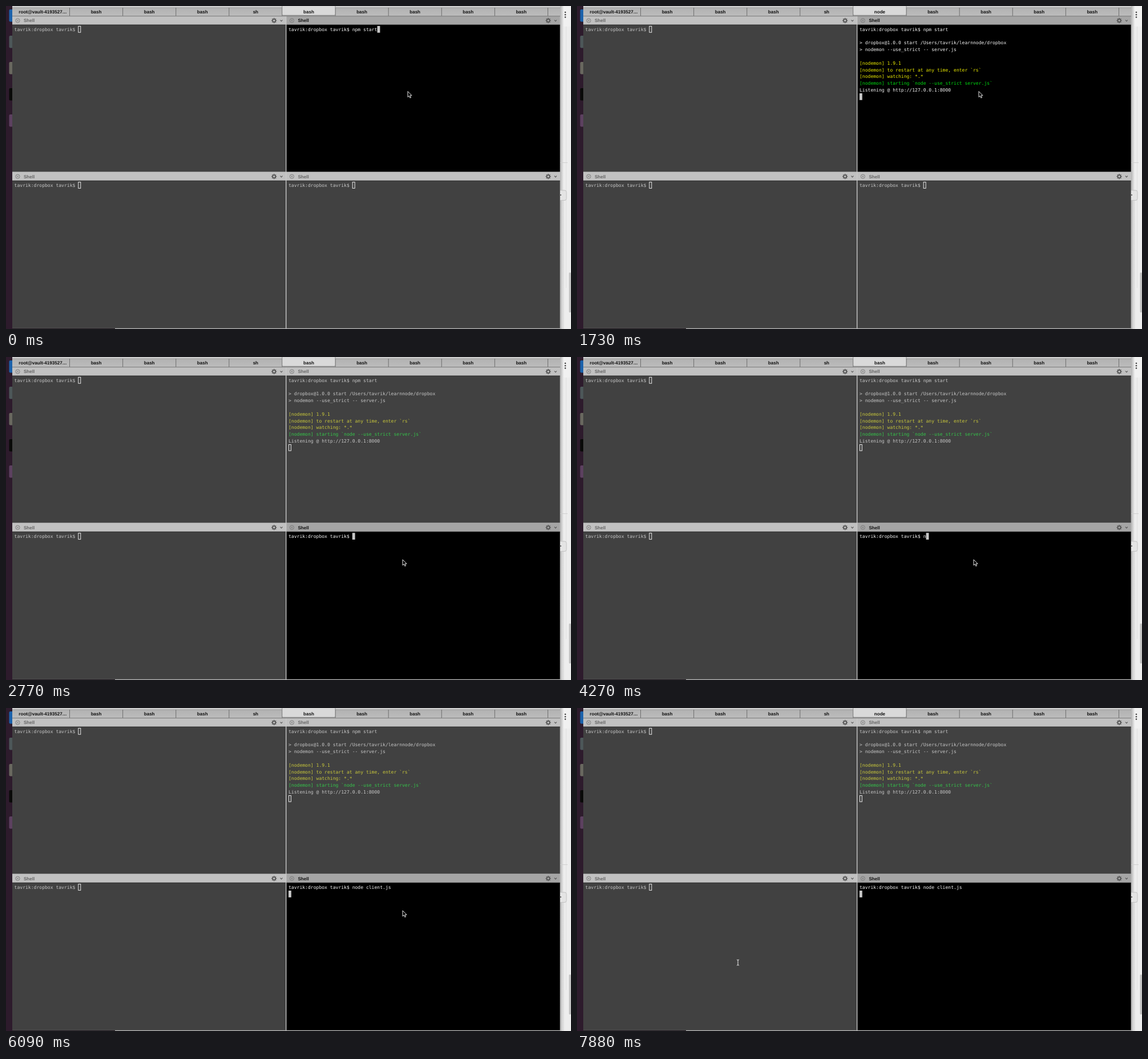
Recreate the animation shown at these times as an HTML page. Size 990 by 566 pixels, loop 8 s.

```html
<!DOCTYPE html>
<html lang="en">
<head>
<meta charset="utf-8">
<title>Split terminal</title>
<style>
html, body { margin: 0; width: 100%; height: 100%; overflow: hidden; background: #2d1b2c; }
svg { display: block; width: 990px; height: 566px; }
text { white-space: pre; text-rendering: geometricPrecision; }
.mono { font: 8.07px "DejaVu Sans Mono", monospace; }
.label { font: bold 8.05px "Liberation Sans", Arial, sans-serif; }
</style>
</head>
<body>
<svg id="stage" viewBox="0 0 990 566">
  <defs>
    <linearGradient id="tabs" x2="0" y2="1">
      <stop offset="0" stop-color="#b2b2b2"/><stop offset="1" stop-color="#bcbcbc"/>
    </linearGradient>
    <linearGradient id="shade">
      <stop offset="0" stop-color="#b4b4b4"/><stop offset="1" stop-color="#ececec"/>
    </linearGradient>
  </defs>
  <g id="back"></g>
  <g id="panes"></g>
  <g id="top"></g>
</svg>
<script>
const LOOP = 8000, CHAR = 4.86, ROW = 11.8;
const USER = "tavrik";
const PROMPT = `${USER}:dropbox ${USER}$ `;
const SVG = "http://www.w3.org/2000/svg";
const group = id => document.getElementById(id);

function add(parent, tag, attrs, content) {
  const el = document.createElementNS(SVG, tag);
  for (const key in attrs) el.setAttribute(key, attrs[key]);
  if (content !== undefined) el.textContent = content;
  parent.append(el);
  return el;
}
const rect = (parent, x, y, width, height, fill, more) =>
  add(parent, "rect", { x, y, width, height, fill, ...more });
const path = (parent, d, stroke, more) =>
  add(parent, "path", { d, stroke, fill: "none", ...more });

// Desktop around the window
function drawBack() {
  const g = group("back");
  rect(g, 0, 0, 11, 566, "#2d1b2c");
  [["#1c62ab", 6], ["#4d5759", 52], ["#69685f", 98], ["#090a08", 144], ["#5d4160", 190]]
    .forEach(([fill, y]) => rect(g, 5.5, y, 9, 21.5, fill, { rx: 2 }));
  rect(g, 971, 0, 19, 566, "#f1f1f1");
  rect(g, 971, 36, 19, 530, "#ededed");
  rect(g, 971, 0, 6, 566, "url(#shade)");
  rect(g, 976.5, 341, 1, 225, "#d5d5d5");
  rect(g, 981, 36, 1, 458, "#e0e0e0");
  rect(g, 971, 274, 13, 1, "#cfcfcf");
  rect(g, 966, 323, 16, 17.5, "#e4e4e4", { rx: 3, stroke: "#c2c2c2" });
  rect(g, 971, 330.5, 2, 1.5, "#444");
  rect(g, 986.5, 467, 3.5, 70, "#c1c1c1", { rx: 1.5 });
  [11, 15.3, 19.6].forEach(cy => add(g, "circle", { cx: 980, cy, r: 1.3, fill: "#444" }));
  rect(g, 11, 0, 960, 3, "#cdcdcd");
  rect(g, 11, 564, 180, 2, "#1d171d");
  rect(g, 191, 564, 780, 2, "#b6b6b6");
}

// Tab bar; returns the label of the selected tab
function drawTabs() {
  const g = group("top");
  const edge = i => i ? 111.5 + 93.1 * (i - 1) : 17.5;
  const label = (i, s) => add(g, "text", {
    class: "label", x: (edge(i) + edge(i + 1)) / 2, y: 13, "text-anchor": "middle", fill: "#111"
  }, s);
  rect(g, 11, 3, 960, 15, "url(#tabs)");
  rect(g, 11, 2.6, 960, .8, "#8f8f8f");
  rect(g, 11, 17.3, 960, .9, "#707070");
  for (let i = 1; i <= 10; i++) rect(g, edge(i) - .4, 3, .9, 14.5, "#666");
  rect(g, 483.8, -3, 93.2, 19.3, "#d9d9d9", { rx: 2, stroke: "#777", "stroke-width": .8 });
  ["root@vault-4193527…", "bash", "bash", "bash", "sh", "", "bash", "bash", "bash", "bash"]
    .forEach((s, i) => s && label(i, s));
  return label(5, "bash");
}

function drawGear(g, x, y) {
  for (let i = 0; i < 8; i++) {
    rect(g, x - .75, y - 4.6, 1.5, 2.2, "#555", { transform: `rotate(${i * 45} ${x} ${y})` });
  }
  add(g, "circle", { cx: x, cy: y, r: 2.5, fill: "none", stroke: "#555", "stroke-width": 1.6 });
}

function makePane(x, y, width) {
  const g = add(group("panes"), "g");
  const bar = rect(g, x, y, width, 15, "#c1c1c1");
  const cx = x + 9.5, cy = y + 7.5;
  add(g, "circle", { cx, cy, r: 3.6, fill: "none", stroke: "#777", "stroke-width": .9 });
  path(g, `M${cx - 1.4} ${cy - 1.4}l2.8 2.8m0-2.8l-2.8 2.8`, "#777", { "stroke-width": .9 });
  const title = add(g, "text", { class: "label", x: x + 20, y: y + 10.4 }, "Shell");
  drawGear(g, x + 458.7, cy);
  path(g, `M${x + 469.5} ${cy - 1}l2 2.2l2-2.2`, "#555", { "stroke-width": 1.1 });
  const body = rect(g, x, y + 15, width, y < 100 ? 257.5 : 258.5, "#414141");
  rect(g, x, y + 14.6, width, .8, "#1c1c1c");
  const lines = add(g, "g", { class: "mono" });
  const left = x + 3.6, first = y + 17;

  return function show(rows, active, row, col) {
    bar.setAttribute("fill", active ? "#a5a5a5" : "#c1c1c1");
    title.setAttribute("fill", active ? "#111" : "#666");
    body.setAttribute("fill", active ? "#000" : "#414141");
    const inks = active
      ? { w: "#f4f4f4", y: "#e9e900", g: "#00d911" }
      : { w: "#c6c6c6", y: "#c9c83b", g: "#35c64b" };
    lines.replaceChildren();
    rows.forEach(([s, ink = "w"], i) => s && add(lines, "text",
      { x: left, y: first + ROW * i + 8.7, fill: inks[ink] }, s));
    const cx = left + CHAR * col, cy = first + ROW * row;
    if (active) rect(lines, cx, cy, CHAR, ROW, "#c7c7c7");
    else rect(lines, cx + .4, cy + .4, 4, 10.8, "none", { stroke: "#f0f0f0", "stroke-width": .95 });
  };
}

const SERVER = [
  [PROMPT + "npm start"], [""],
  [`> dropbox@1.0.0 start /Users/${USER}/learnnode/dropbox`],
  ["> nodemon --use_strict -- server.js"], [""],
  ["[nodemon] 1.9.1", "y"],
  ["[nodemon] to restart at any time, enter `rs`", "y"],
  ["[nodemon] watching: *.*", "y"],
  ["[nodemon] starting `node --use_strict server.js`", "g"],
  ["Listening @ http://127.0.0.1:8000"]
];

// Each step changes part of the state from its time on.
// rows: server lines, at: server cursor [row, col], typed: client command, ran: command entered
const STEPS = [
  [0, { rows: 1, at: [0, 32], typed: "", ran: false, tab: "bash", client: false, mouse: [704, 149.6] }],
  [750, { at: [1, 0] }],
  [1140, { rows: 4, at: [5, 0] }],
  [1440, { rows: 9, at: [9, 0] }],
  [1730, { rows: 10, at: [10, 0], tab: "node" }],
  [2180, { mouse: [693.8, 250.4] }],
  [2320, { mouse: [693.8, 355] }],
  [2470, { mouse: [695, 355] }],
  [2770, { client: true, tab: "bash" }],
  [4270, { typed: "n" }],
  [4440, { typed: "no" }],
  [4590, { typed: "nod" }],
  [4740, { typed: "node" }],
  [4890, { typed: "node " }],
  [5040, { typed: "node c" }],
  [5190, { typed: "node cl" }],
  [5490, { typed: "node client.js " }],
  [6090, { ran: true }],
  [6530, { tab: "node" }],
  [7580, { mouse: [439, 388.5], beam: true }],
  [7730, { mouse: [286, 448.5] }],
  [7880, { mouse: [282, 446] }]
];

drawBack();
rect(group("panes"), 11, 18, 960, 546.5, "#c9c9c9");
const serverPane = makePane(491.4, 18, 479.3);
const clientPane = makePane(491.4, 291.2, 479.3);
const idlePanes = [makePane(11, 18, 479), makePane(11, 291.2, 479)];
const tabLabel = drawTabs();
idlePanes.forEach(show => show([[PROMPT]], false, 0, PROMPT.length));

const arrow = path(group("top"), "M0 0V10L2.3 7.9L3.9 11.5L5.5 10.8L4 7.3H7.1Z", "#fff",
  { fill: "#000", "stroke-width": .9 });
const beam = path(group("top"), "M-2 -5Q0 -5 0 -3.5V3.5Q0 5 -2 5M2 -5Q0 -5 0 -3.5M0 3.5Q0 5 2 5", "#f0f0f0");

function render(s) {
  serverPane(SERVER.slice(0, s.rows), !s.client, ...s.at);
  clientPane([[PROMPT + s.typed]], s.client, s.ran ? 1 : 0, s.ran ? 0 : PROMPT.length + s.typed.length);
  tabLabel.textContent = s.tab;
  arrow.style.display = s.beam ? "none" : "";
  beam.style.display = s.beam ? "" : "none";
  (s.beam ? beam : arrow).setAttribute("transform", `translate(${s.mouse})`);
}

const start = performance.now();
let shown = 0;
function tick(now) {
  const t = Math.max(0, now - start) % LOOP;
  const count = STEPS.filter(([at]) => at <= t).length;
  if (count !== shown) {
    render(Object.assign({}, ...STEPS.slice(0, count).map(step => step[1])));
    shown = count;
  }
  requestAnimationFrame(tick);
}
tick(start);
</script>
</body>
</html>
```
